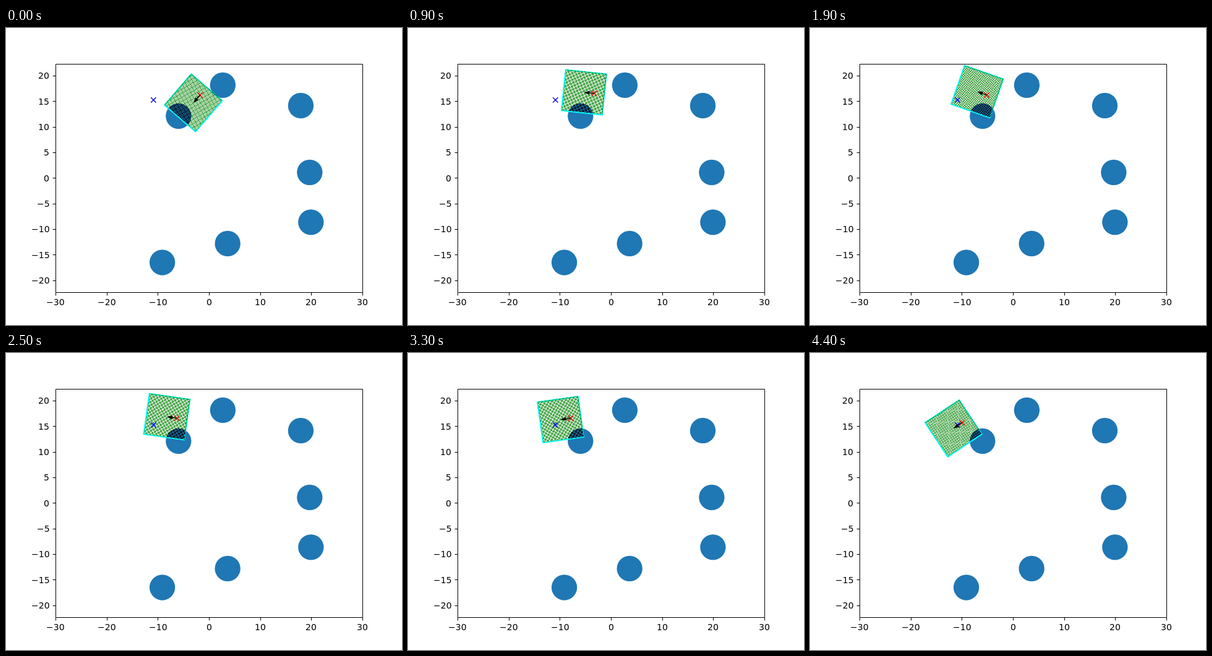
Recreate the animation shown at these times as an HTML page with a canvas. Size 640 by 480 pixels, loop 4500 ms.

```html
<!DOCTYPE html>
<html lang="en">
<head>
<meta charset="utf-8">
<title>Local map of a moving robot</title>
<style>
  html, body { margin: 0; width: 100%; height: 100%; overflow: hidden; background: #fff; }
  canvas { display: block; width: 640px; height: 480px; }
</style>
</head>
<body>
<canvas id="stage" width="640" height="480"></canvas>
<script>
const ctx = document.getElementById('stage').getContext('2d');
const UNIT = 496 / 60;            // pixels per data unit
const PT = 100 / 72;              // pixels per point
const LOOP = 4500, STEP = 100;
const BOX = { left: 80, top: 57.6, right: 576, bottom: 427.2 };
const toX = v => 328 + v * UNIT;
const toY = v => 242.4 - v * UNIT;

const SIDE = 8 * UNIT, CELLS = 54, BACK = -2 * UNIT;
const RADIUS = 2.5 * UNIT;
const GOAL = [toX(-10.85), toY(15.25)];
const OBSTACLES = [
  [-5.95, 12.1], [2.71, 18.15], [17.96, 14.15], [19.7, 1.1],
  [19.94, -8.64], [3.65, -12.82], [-9.12, -16.52]
].map(([x, y]) => [toX(x), toY(y)]);

// turning points of the steering: step, heading in degrees (clockwise on screen)
const TURNS = [
  [0, 130.7], [5, 216], [7, 216], [12, 141], [13, 145.5],
  [18, 198], [22, 203], [25, 188], [30, 181], [37, 160], [44, 146.4]
];

function headingAt(step) {
  const i = Math.max(1, TURNS.findIndex(t => t[0] >= step));
  const [s0, a] = TURNS[i - 1], [s1, b] = TURNS[i];
  return (a + (b - a) * (step - s0) / (s1 - s0)) * Math.PI / 180;
}

// drive along the heading, speeding up slightly
function poseAt(step) {
  let x = toX(-1.74), y = toY(16.2);
  for (let i = 1; i <= step; i++) {
    const v = (0.189 + 0.0005 * i) * UNIT;
    x += v * Math.cos(headingAt(i));
    y += v * Math.sin(headingAt(i));
  }
  return { x, y, angle: headingAt(step) };
}

function line(points, color, width, closed) {
  ctx.beginPath();
  points.forEach(p => ctx.lineTo(...p));
  if (closed) ctx.closePath();
  ctx.strokeStyle = color;
  ctx.lineWidth = width;
  ctx.stroke();
}

function cross([x, y], color) {
  const r = 3 * PT;
  line([[x - r, y - r], [x + r, y + r]], color, PT);
  line([[x - r, y + r], [x + r, y - r]], color, PT);
}

const snap = v => Math.floor(v + 0.5) + 0.5;

// align: 0.5 centres the label on x, 1 ends it there
function label(value, x, y, align) {
  const text = String(value).replace('-', '\u2212');
  const width = ctx.measureText(text).width;
  ctx.fillText(text, Math.round(x - width * align), Math.round(y));
}

function drawAxes() {
  const tick = 3.5 * PT;
  const left = snap(BOX.left), right = snap(BOX.right);
  const top = snap(BOX.top), bottom = snap(BOX.bottom);
  line([[left, top], [right, top], [right, bottom], [left, bottom]], '#000', 1, true);
  ctx.fillStyle = '#000';
  ctx.font = '14px "DejaVu Sans", sans-serif';
  for (let v = -30; v <= 30; v += 10) {
    const x = snap(toX(v));
    line([[x, bottom], [x, bottom + tick]], '#000', 1);
    label(v, toX(v), 448, 0.5);
  }
  for (let v = -20; v <= 20; v += 5) {
    const y = snap(toY(v));
    line([[left, y], [left - tick, y]], '#000', 1);
    label(v, 70.3, toY(v) + 5.2, 1);
  }
}

function drawObstacles() {
  ctx.fillStyle = '#1f77b4';
  for (const [x, y] of OBSTACLES) {
    ctx.beginPath();
    ctx.arc(x, y, RADIUS, 0, 2 * Math.PI);
    ctx.fill();
  }
}

function drawRobot({ x, y, angle }) {
  const c = Math.cos(angle), s = Math.sin(angle);
  // robot frame: distance ahead, distance to the left
  const at = (ahead, left) => [x + c * ahead + s * left, y + s * ahead - c * left];
  const half = SIDE / 2, front = BACK + SIDE;
  line([at(BACK, -half), at(front, -half), at(front, half), at(BACK, half)],
    '#0ff', 1.5 * PT, true);

  const cell = SIDE / CELLS;
  for (let i = 0; i < CELLS; i++) {
    for (let j = 0; j < CELLS; j++) {
      const [px, py] = at(BACK + i * cell, j * cell - half);
      const hit = OBSTACLES.some(o => Math.hypot(px - o[0], py - o[1]) < RADIUS);
      ctx.fillStyle = hit ? 'rgba(0,0,0,.75)' : 'rgba(0,128,0,.7)';
      ctx.fillRect(Math.floor(px), Math.floor(py), 1, 1);
    }
  }

  cross(GOAL, '#00f');
  cross([x, y], '#f00');
  const tip = 1.75 * UNIT, wing = 0.25 * UNIT;
  line([[x, y], at(UNIT, 0)], '#000', PT);
  line([at(tip, 0), at(UNIT, wing), at(UNIT, -wing)], '#000', PT, true);
  ctx.fillStyle = '#000';
  ctx.fill();
}

function draw(step) {
  ctx.fillStyle = '#fff';
  ctx.fillRect(0, 0, 640, 480);
  ctx.save();
  ctx.beginPath();
  ctx.rect(80, 58, 496, 369);
  ctx.clip();
  drawObstacles();
  drawRobot(poseAt(step));
  ctx.restore();
  drawAxes();
}

let shown = -1;
function tick() {
  const step = Math.floor(performance.now() % LOOP / STEP);
  if (step !== shown) draw(shown = step);
  requestAnimationFrame(tick);
}
tick();
</script>
</body>
</html>
```
